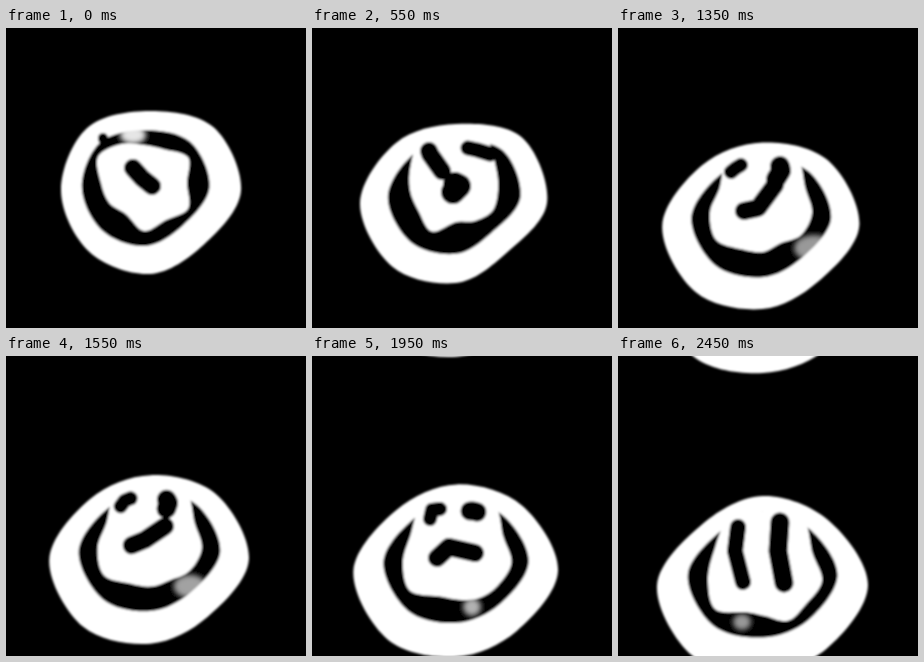
These frames come from a looping animation (300x300 px, 2500 ms). An HTML page:

```html
<!DOCTYPE html>
<html lang="en">
<head>
<meta charset="utf-8">
<title>Drifting cell</title>
<style>
html, body { margin: 0; width: 100%; height: 100%; overflow: hidden; background: #000; }
svg { display: block; width: 100vw; height: 100vh; }
</style>
</head>
<body>
<svg viewBox="0 0 300 300">
  <defs>
    <filter id="soft" filterUnits="userSpaceOnUse" x="-20" y="-20" width="340" height="380">
      <feGaussianBlur stdDeviation="1.3"/>
    </filter>
    <filter id="mist" filterUnits="userSpaceOnUse" x="-20" y="-20" width="340" height="380">
      <feGaussianBlur stdDeviation="2.5"/>
    </filter>
  </defs>
  <rect width="300" height="300" fill="#000"/>
  <g id="cell" filter="url(#soft)">
    <path id="rim" fill="#fff"/>
    <path id="gap"/>
    <path id="body" fill="#fff"/>
    <g fill="none" stroke="#000" stroke-linecap="round" stroke-linejoin="round">
      <path id="left"/>
      <path id="right"/>
      <path id="core"/>
    </g>
    <ellipse id="glow" fill="#fff" filter="url(#mist)"/>
  </g>
  <use href="#cell" y="-300"/>
</svg>
<script>
const LOOP = 2500, STEP = 50, GAP = 0.71;

// Blobs: centre x, y, then radii at even angles, clockwise from the right.
const rim = {
  0: [144, 163, 91, 76, 83, 86, 89, 89, 80, 90],
  550: [144, 175, 91, 71, 80, 90, 96, 85, 79, 93],
  2450: [145, 229, 105, 90, 88, 100, 106, 86, 89, 92]
};
const body = {
  0: [138, 155, 43, 51, 43, 48, 36, 40, 43, 53, 45, 38, 39, 51],
  550: [144, 162, 42, 42, 36, 32, 48, 43, 46, 52, 66, 60, 60, 46],
  1350: [145, 185, 49, 44, 35, 39, 42, 54, 53, 50, 68, 62, 66, 49],
  2450: [147, 225, 57, 47, 46, 35, 36, 57, 57, 59, 72, 70, 74, 55]
};

// Offset of the dark ring from the centre of the rim.
const shift = { 0: [-5, -4], 550: [0, -6], 2450: [0, -10] };

// Holes: a bent stroke through three points, then its width.
const holes = {
  left: {
    0: [97, 110, 97, 111, 98, 112, 10],
    550: [117, 123, 118, 126, 130, 143, 18],
    1350: [123, 137, 118, 140, 113, 144, 14],
    1950: [128, 153, 120, 154, 118, 163, 14],
    2450: [120, 171, 117, 195, 125, 226, 16]
  },
  right: {
    0: [156, 110, 164, 111, 172, 114, 8],
    550: [156, 120, 165, 122, 178, 126, 15],
    1350: [162, 138, 163, 143, 158, 151, 20],
    1950: [158, 155, 161, 155, 165, 156, 19],
    2450: [162, 166, 160, 195, 166, 227, 19]
  },
  core: {
    0: [127, 140, 136, 150, 146, 158, 18],
    550: [143, 156, 147, 158, 141, 164, 24],
    1350: [126, 183, 140, 180, 157, 157, 18],
    1950: [125, 202, 137, 191, 163, 197, 18],
    2450: [120, 208, 121, 215, 127, 226, 12]
  }
};

// Pale bridge across the ring: centre, radii, opacity.
const glow = {
  0: [127, 107, 13, 9, 0.9],
  550: [127, 112, 13, 9, 0],
  900: [196, 205, 20, 12, 0],
  1350: [196, 220, 20, 13, 0.6],
  1950: [160, 251, 9, 9, 0.7],
  2450: [124, 266, 9, 8, 0.6]
};

const $ = id => document.getElementById(id);
const set = (id, attrs) => {
  for (const name in attrs) $(id).setAttribute(name, attrs[name]);
};

function at(keys, t) {
  const times = Object.keys(keys).map(Number);
  let i = 0;
  while (i < times.length - 2 && t >= times[i + 1]) i++;
  const [from, to] = [times[i], times[i + 1]];
  const u = (t - from) / (to - from);
  return keys[from].map((x, k) => x + (keys[to][k] - x) * u);
}

// Smooth closed curve through points placed around a centre.
function blob([cx, cy, ...radii]) {
  const n = radii.length;
  const pt = i => {
    const k = (i + n) % n, a = k / n * 2 * Math.PI;
    return [cx + radii[k] * Math.cos(a), cy + radii[k] * Math.sin(a)];
  };
  let d = 'M' + pt(0);
  for (let i = 0; i < n; i++) {
    const [a, b, c, e] = [pt(i - 1), pt(i), pt(i + 1), pt(i + 2)];
    const p = b.map((x, j) => x + (c[j] - a[j]) / 6);
    const q = c.map((x, j) => x - (e[j] - b[j]) / 6);
    d += `C${p} ${q} ${c}`;
  }
  return d + 'Z';
}

function render(ms) {
  const t = Math.floor(ms % LOOP / STEP) * STEP;

  const edge = at(rim, t);
  const [x, y, ...radii] = edge;
  const [dx, dy] = at(shift, t);
  set('rim', { d: blob(edge) });
  set('gap', { d: blob([x + dx, y + dy, ...radii.map(r => r * GAP)]) });
  set('body', { d: blob(at(body, t)) });

  for (const id in holes) {
    const v = at(holes[id], t);
    set(id, { d: `M${v.slice(0, 2)}L${v.slice(2, 6)}`, 'stroke-width': v[6] });
  }

  const [cx, cy, rx, ry, opacity] = at(glow, t);
  set('glow', { cx, cy, rx, ry, opacity });
}

const start = performance.now();
function tick() {
  render(performance.now() - start);
  requestAnimationFrame(tick);
}
tick();
</script>
</body>
</html>
```
